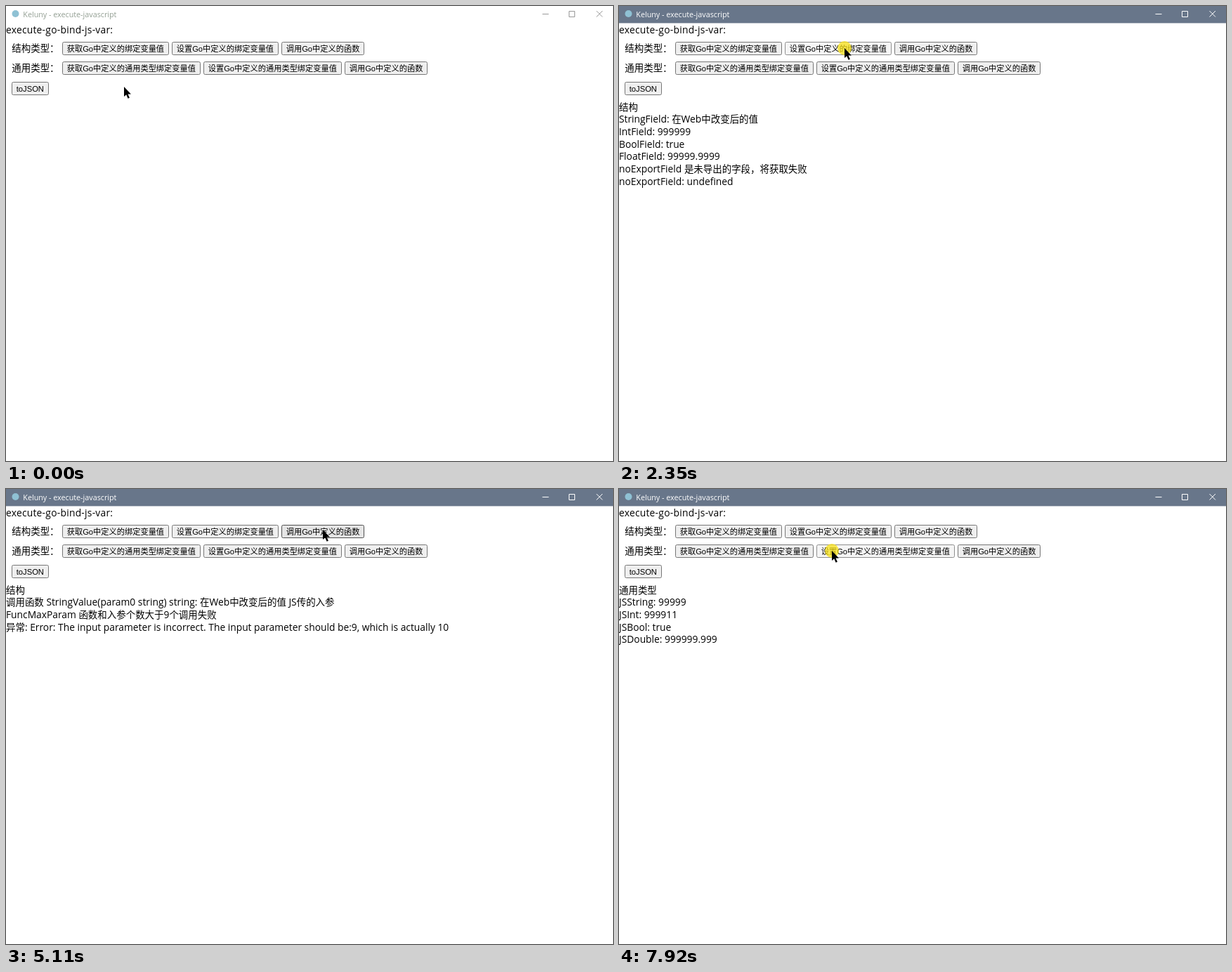
Animation of 864x648 px, one loop 8000 ms. Source, as an HTML page:

```html
<!DOCTYPE html>
<html lang="zh-CN">
<head>
<meta charset="utf-8">
<title>execute-javascript</title>
<style>
  html, body { margin: 0; width: 100%; height: 100%; overflow: hidden; background: #fff; }
  svg { display: block; width: 864px; height: 648px; }
  text { font: 13.8px "Open Sans", "Noto Sans", sans-serif; white-space: pre; fill: #000; }
  .cjk { font: 13.46px "Noto Sans CJK SC", "Noto Sans CJK", sans-serif; }
  .heading { letter-spacing: .26px; }

  .button rect { fill: #efefef; stroke: #767676; }
  .button text, .button .cjk { font-size: 11.23px; }
  .button text { font-family: "Liberation Sans", "Noto Sans CJK SC", sans-serif; }
  .button.hover rect { fill: #e5e5e5; stroke: #4f4f4f; }
  .button.pressed rect { fill: #f5f5f5; stroke: #8d8d8d; }

  /* The window gains focus with the first click, a tenth into the loop. */
  #bar { fill: #68768a; --idle: #fff; }
  #title { font-size: 10.75px; fill: #fff; --idle: #939f93; }
  #controls { fill: none; stroke: #fff; --idle: #999; }
  #bar, #title, #controls { animation: idle 8s -10ms step-end infinite; }
  #controls { animation-name: idle-stroke; }
  @keyframes idle { 0% { fill: var(--idle); } 10% { } }
  @keyframes idle-stroke { 0% { stroke: var(--idle); } 10% { } }
  @keyframes idle { 0% { fill: var(--idle); } 10%, 100% { fill: var(--focus); } }
  @keyframes idle-stroke { 0% { stroke: var(--idle); } 10%, 100% { stroke: var(--focus); } }
  #bar { --focus: #68768a; }
  #title, #controls { --focus: #fff; }
</style>
</head>
<body>
<svg viewBox="0 0 864 648">
  <rect id="bar" width="864" height="24.4"/>
  <circle cx="13.5" cy="11" r="5" fill="#8fc1d4"/>
  <text id="title" x="24.3" y="15.5">Keluny - execute-javascript</text>
  <g id="controls">
    <path d="M763.5 11.5h9M801.5 7.5h8v8h-8z"/>
    <path d="M840.5 7l8.5 8.5M849 7l-8.5 8.5"/>
  </g>
  <text class="heading" x="0" y="38.8">execute-go-bind-js-var:</text>
  <g id="page"></g>
  <g id="output"></g>
  <g id="cursor">
    <circle id="click" r="10" fill="#f7e017" fill-opacity=".75"/>
    <path d="M0 0V14L3.2 11.2L5.6 16.8L7.9 15.8L5.5 10.4H9.9Z"/>
  </g>
</svg>
<script>
const LOOP = 8000, FRAME = 68, LEAD = 10;
const $ = id => document.getElementById(id);

const markCjk = s => s.replace(/[\u2e80-\uffef]+/g, '<tspan class="cjk">$&</tspan>');
const label = (x, y, s) => `<text x="${x}" y="${y}">${markCjk(s)}</text>`;

function addButton(x, y, caption) {
  const node = document.createElementNS('http://www.w3.org/2000/svg', 'g');
  node.setAttribute('class', 'button');
  node.innerHTML = `<rect x="${x + .5}" y="${y + .5}" height="18" rx="2"/>` + label(x + 6.7, y + 14, caption);
  $('page').append(node);
  const width = Math.round(node.lastChild.getComputedTextLength() + 13.4);
  node.firstChild.setAttribute('width', width - 1);
  return { node, x, y, right: x + width };
}

const buttons = [];
function addRow(y, x, captions) {
  for (const caption of captions) {
    const button = addButton(x, y, caption);
    buttons.push(button);
    x = button.right + 4;
  }
}

const actions = kind => [`获取Go中定义的${kind}绑定变量值`, `设置Go中定义的${kind}绑定变量值`, '调用Go中定义的函数'];
$('page').innerHTML = label(8.3, 65.4, '结构类型：') + label(8.3, 93.4, '通用类型：');
addRow(51, 80, actions(''));
addRow(79, 80, actions('通用类型'));
addRow(108, 8, ['toJSON']);

const cleared = ['结构'];
const fields = ['结构', 'StringField: 在Web中改变后的值', 'IntField: 999999', 'BoolField: true',
  'FloatField: 99999.9999', 'noExportField 是未导出的字段，将获取失败', 'noExportField: undefined'];
const calls = ['结构', '调用函数 StringValue(param0 string) string: 在Web中改变后的值 JS传的入参',
  'FuncMaxParam 函数和入参个数大于9个调用失败',
  '异常: Error: The input parameter is incorrect. The input parameter should be:9, which is actually 10'];
const generic = ['通用类型', 'JSString: 99999', 'JSInt: 999911', 'JSBool: true', 'JSDouble: 999999.999'];

// Each visit moves the cursor to (x, y), sagging by `sag` midway, clicks, and prints on release.
const visits = [
  { leave: 70, arrive: 530, press: 800, release: 930, x: 179, y: 64, sag: 0, prints: fields },
  { leave: 1460, arrive: 2220, press: 2350, release: 2490, x: 321, y: 60, sag: 19, prints: cleared },
  { leave: 2690, arrive: 3300, press: 3370, release: 3500, x: 210, y: 61, sag: 11, prints: fields },
  { leave: 3720, arrive: 4590, press: 4920, release: 5110, x: 451, y: 58, sag: -22, prints: calls },
  { leave: 5640, arrive: 6380, press: 6640, release: 6840, x: 172, y: 84, sag: 0, prints: generic },
  { leave: 7190, arrive: 7720, press: 7920, release: LOOP, x: 303, y: 88, sag: 0, prints: generic }
];

const easeOut = p => 1 - (1 - p) ** 3;
const mix = (a, b, p) => a + (b - a) * p;

function cursorAt(t) {
  let from = { x: 168, y: 115 };
  for (const v of visits) {
    if (t < v.leave) break;
    if (t < v.arrive) {
      const steps = Math.floor((t - v.leave) / FRAME) + 1;
      const p = easeOut(Math.min(1, steps * FRAME / (v.arrive - v.leave + FRAME)));
      return { x: mix(from.x, v.x, p), y: mix(from.y, v.y, p) + v.sag * 4 * p * (1 - p) };
    }
    from = v;
  }
  return from;
}

let shown = null;
function print(lines) {
  if (lines === shown) return;
  shown = lines;
  $('output').innerHTML = lines.map((s, i) => label(0, 148.5 + 17.73 * i, s)).join('');
}

function render(t) {
  const { x, y } = cursorAt(t);
  const pressed = visits.some(v => t >= v.press && t < v.release);
  $('cursor').setAttribute('transform', `translate(${Math.round(x)} ${Math.round(y)})`);
  $('click').style.display = pressed ? '' : 'none';
  for (const b of buttons) {
    const over = x >= b.x && x < b.right && y >= b.y && y < b.y + 19;
    b.node.classList.toggle('hover', over && !pressed);
    b.node.classList.toggle('pressed', over && pressed);
  }
  print(visits.filter(v => v.release <= t).pop()?.prints ?? []);
}

const start = performance.now();
function tick() {
  render((performance.now() - start + LEAD) % LOOP);
  requestAnimationFrame(tick);
}
tick();
</script>
</body>
</html>
```
